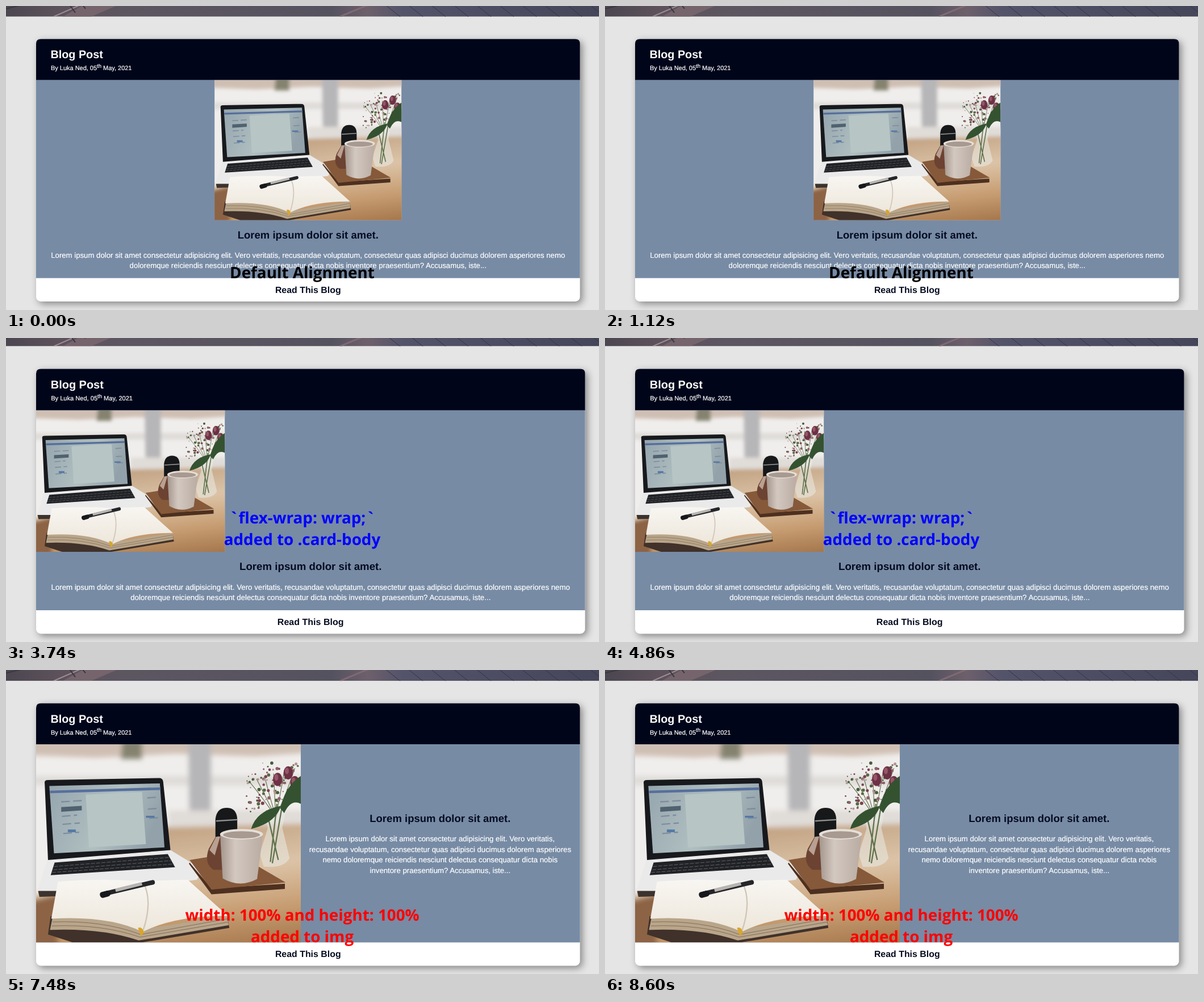
Animation, 1044 px wide and 536 px high, one loop 9350 ms. Source, as an HTML page:

```html
<!DOCTYPE html>
<html lang="en">
<head>
<meta charset="utf-8">
<title>Card layout steps</title>
<style>
  html, body { margin: 0; width: 100%; height: 100%; overflow: hidden; background: #e5e5e5; }
  svg { display: block; }
  text { font-family: "Liberation Sans", Arial, sans-serif; text-rendering: geometricPrecision; }
  .sheet { fill: #fff; filter: drop-shadow(5px 5px 8px rgba(0, 0, 0, .42)); }
  .head { fill: #00051a; }
  .body { fill: #778ba5; }
  .name { font-size: 24px; font-weight: bold; fill: #fff; }
  .byline { font-size: 13.33px; fill: #fff; stroke: #fff; stroke-width: .25px; }
  .sup { font-size: 11.5px; }
  .title { font-size: 22.4px; font-weight: bold; letter-spacing: .06px; fill: #050b20; }
  .copy { font-size: 16px; fill: #fff; stroke: #fff; stroke-width: .25px; }
  .link { font-size: 19.2px; font-weight: bold; letter-spacing: .06px; fill: #050b20; }
  .mid { text-anchor: middle; }
  .caption { font: bold 27.8px "Open Sans", "Noto Sans", sans-serif; }
</style>
</head>
<body>
<svg id="stage" width="1044" height="536" viewBox="0 0 1044 536">
  <defs>
    <linearGradient id="bannerTone">
      <stop offset="0" stop-color="#4b4650"/>
      <stop offset=".09" stop-color="#5d525b"/>
      <stop offset=".2" stop-color="#5c5661"/>
      <stop offset=".55" stop-color="#55525f"/>
      <stop offset=".61" stop-color="#6d606b"/>
      <stop offset=".67" stop-color="#53536a"/>
      <stop offset="1" stop-color="#45465a"/>
    </linearGradient>
    <linearGradient id="wood" x1=".5" x2=".75" y2="1">
      <stop offset="0" stop-color="#c0a080"/>
      <stop offset=".35" stop-color="#dcc4a8"/>
      <stop offset=".65" stop-color="#c79d72"/>
      <stop offset="1" stop-color="#9a6a40"/>
    </linearGradient>
    <linearGradient id="screen" x2="1" y2=".3">
      <stop offset="0" stop-color="#95a5ae"/>
      <stop offset=".6" stop-color="#b0bfc0"/>
      <stop offset="1" stop-color="#93a2aa"/>
    </linearGradient>
    <linearGradient id="mug">
      <stop offset="0" stop-color="#a3958c"/>
      <stop offset=".35" stop-color="#d3c8c0"/>
      <stop offset="1" stop-color="#b9aba2"/>
    </linearGradient>
    <linearGradient id="page" y2="1" x2="0">
      <stop offset="0" stop-color="#f8f6f2"/>
      <stop offset="1" stop-color="#ede6da"/>
    </linearGradient>
    <filter id="soft"><feGaussianBlur stdDeviation="4"/></filter>
    <symbol id="photo" viewBox="0 0 400 300" preserveAspectRatio="none">
      <path fill="#f0eeec" d="M0 0H400V300H0Z"/>
      <g filter="url(#soft)">
        <path fill="#cfbfb3" d="M-20-20H420V12L330 18 210 14 90 20-20 16Z"/>
        <path fill="#85836f" d="M132-20H160V22H128Z"/>
        <path fill="#dedbd8" d="M-20 48H420V62H-20Z"/>
        <path fill="#b6b5b7" d="M230-20H264V122H232Z"/>
        <path fill="#e0dcd8" d="M200 100H420V130H200Z"/>
        <path fill="url(#wood)" d="M185 126 420 120V330H-20V235L30 215Z"/>
        <path fill="#8d6444" d="M-20 240 40 225 30 330H-20Z"/>
      </g>
      <path fill="#3c332e" d="M3 222 90 202 62 229 5 231Z"/>
      <path fill="#eaeaea" d="M17 175 203 160 252 190 243 205 120 222 2 222Z"/>
      <path fill="#202226" d="M28 179 199 166 210 186 22 198Z"/>
      <path stroke="#6c7075" stroke-width=".7" fill="none" stroke-dasharray="6 2" d="M27 185 202 171M26 190 205 176M24 194 208 181"/>
      <path fill="#17191d" d="M13 59Q12 54 18 54L186 51Q191 51 192 56L203 160 18 175Z"/>
      <path fill="url(#screen)" d="M20 63 187 59 194 156 27 165Z"/>
      <path fill="#566f9c" d="M21 70 188 65V69L21 74Z"/>
      <path fill="#b7c6c5" d="M75 76 160 72 166 151 80 156Z"/>
      <path fill="#50616f" d="M38 95 69 93V100L38 102Z"/>
      <path stroke="#7e8d9e" stroke-width="2" fill="none" stroke-dasharray="13 5" d="M38 87 70 85M39 109 62 107M40 121 66 119M41 135 65 133M168 81 182 80M169 98 184 97M171 112 185 111"/>
      <path fill="#5479a6" d="M48 129H60V133H48ZM166 108H179V111H166Z"/>
      <g id="bouquet" fill="none"></g>
      <path fill="#e9ebe6" opacity=".55" d="M344 98H378L372 126 383 172Q375 188 344 185L338 166 350 127Z"/>
      <path fill="none" stroke="#60734e" stroke-width="2" d="M364 90 354 178M372 92 357 180M348 100 366 175"/>
      <path fill="#345230" d="M325 128Q333 100 370 93 362 119 325 128ZM369 97Q377 62 400 48V90Q385 82 375 104Z"/>
      <path fill="#4d301f" d="M232 179 265 218 376 211V219L265 227 231 181Z"/>
      <path fill="#85593a" d="M232 175 300 164 377 209 265 220Z"/>
      <path fill="#6c4232" d="M273 137H303V190H268Q253 180 261 158Z"/>
      <path fill="#e0d3c6" opacity=".65" d="M273 138 262 160 270 168 278 140Z"/>
      <path fill="#16181a" d="M271 140V113Q273 96 288 96T304 113V135Z"/>
      <path stroke="#8f9193" stroke-width="2" d="M272 116 304 114"/>
      <path fill="url(#mug)" d="M278 135 282 203Q308 218 334 204L343 136Z"/>
      <ellipse cx="310.500" cy="136" rx="32.500" ry="8" fill="#e6dfd8"/>
      <ellipse cx="310.500" cy="137" rx="28" ry="5.500" fill="#a89a91"/>
      <path fill="#40312a" d="M22 260 18 288 55 300H160L292 278 290 266 161 288Z"/>
      <path fill="#b9a58a" d="M29 242 21 281Q100 278 155 297L291 274 289 260 160 280Z"/>
      <path fill="none" stroke="#7e6a53" stroke-width=".8" d="M24 275Q100 272 157 292L291 269M25 269Q100 266 158 288L290 264"/>
      <path fill="url(#page)" d="M33 208 Q90 203 158 207L229 205 290 260Q210 259 161 284 110 259 23 264Z"/>
      <path fill="none" stroke="#cfc5b8" stroke-width="2" d="M162 209Q177 238 161 284"/>
      <path fill="#d9a62c" d="M154 278Q161 275 163 286L158 290Z"/>
      <path stroke="#25262a" stroke-width="7" stroke-linecap="round" d="M100 227 176 209"/>
      <path stroke="#b7b4b1" stroke-width="5" d="M120 221 160 211"/>
      <path stroke="#17181b" stroke-width="9" stroke-linecap="round" d="M101 228 108 226"/>
    </symbol>
  </defs>
</svg>
<script>
const STEP = 1870, CARD_W = 1163, HEAD_H = 88, FOOT_H = 50;
const stage = document.getElementById("stage");

const wide = ["Lorem ipsum dolor sit amet consectetur adipisicing elit. Vero veritatis, recusandae voluptatum, consectetur quas adipisci ducimus dolorem asperiores nemo",
  "doloremque reiciendis nesciunt delectus consequatur dicta nobis inventore praesentium? Accusamus, iste..."];
const medium = ["Lorem ipsum dolor sit amet consectetur adipisicing elit. Vero veritatis, recusandae voluptatum,",
  "consectetur quas adipisci ducimus dolorem asperiores nemo doloremque reiciendis nesciunt delectus",
  "consequatur dicta nobis inventore praesentium? Accusamus, iste..."];
const narrow = ["Lorem ipsum dolor sit amet consectetur adipisicing elit. Vero veritatis,",
  "recusandae voluptatum, consectetur quas adipisci ducimus dolorem asperiores",
  "nemo doloremque reiciendis nesciunt delectus consequatur dicta nobis",
  "inventore praesentium? Accusamus, iste..."];

// width and top are on screen; bodyH, img (x, width, height) and textX are in card units.
const scenes = [
  { width: 957.5, top: 58.2, bodyH: 424, img: [381.5, 400, 300], textX: 581.5, lines: wide, stacked: true,
    color: "#000", captionY: 480, caption: ["Default Alignment"] },
  { width: 958.7, top: 56.6, bodyH: 300, img: [0, 400, 300], textX: 781.5, lines: medium,
    color: "#fff", captionY: 480, caption: ["`display: flex;`", "added to .card-body"] },
  { width: 966.5, top: 54.5, bodyH: 424, img: [0, 400, 300], textX: 581.5, lines: wide, stacked: true,
    color: "#00f", captionY: 327, caption: ["`flex-wrap: wrap;`", "added to .card-body"] },
  { width: 962, top: 58.1, bodyH: 300, img: [83, 400, 300], textX: 864, lines: narrow,
    color: "#da70d6", captionY: 480, caption: ["`flex: 1;`", "added to .card-body-column"] },
  { width: 957.5, top: 58.8, bodyH: 424, img: [0, 566, 424], textX: 864, lines: narrow,
    color: "#f00", captionY: 442, caption: ["width: 100% and height: 100%", "added to img"] },
];

const text = (cls, x, y, content, extra = "") =>
  `<text class="${cls}" x="${x}" y="${y}" ${extra}>${content}</text>`;

function card(s, y, day, suffix, month) {
  const foot = HEAD_H + s.bodyH, [imgX, imgW, imgH] = s.img;
  const titleY = s.stacked ? HEAD_H + 339 : HEAD_H + s.bodyH / 2 - 11.2 * s.lines.length - .5;
  const date = `By Luka Ned, ${day}<tspan class="sup" dy="-5">${suffix}</tspan><tspan dy="5"> ${month}, 2021</tspan>`;
  return `<g transform="translate(0 ${y})">
    <rect class="sheet" width="${CARD_W}" height="${foot + FOOT_H}" rx="10"/>
    <path class="head" d="M0 ${HEAD_H}V10Q0 0 10 0H${CARD_W - 10}Q${CARD_W} 0 ${CARD_W} 10V${HEAD_H}Z"/>
    <rect class="body" y="${HEAD_H}" width="${CARD_W}" height="${s.bodyH}"/>
    <use href="#photo" x="${imgX}" y="${HEAD_H}" width="${imgW}" height="${imgH}"/>
    ${text("name", 31, 41, "Blog Post")}
    ${text("byline", 31.5, 66.5, date)}
    ${text("title mid", s.textX, titleY, "Lorem ipsum dolor sit amet.")}
    ${s.lines.map((line, i) => text("copy mid", s.textX, titleY + 41.3 + 22.4 * i, line)).join("")}
    ${text("link mid", CARD_W / 2, foot + 31.7, "Read This Blog")}
  </g>`;
}

function banner(bottom) {
  const rules = Array.from({ length: 11 }, (_, i) => `M${640 + i * 40}-24l60 48`).join("");
  return `<svg width="1044" height="${bottom}"><g transform="translate(0 ${bottom - 19})">
    <path fill="url(#bannerTone)" d="M0-9H1044V19H0Z"/>
    <path fill="#75646c" d="M100 19 150-9H215L150 19Z"/>
    <path stroke="#a08d93" stroke-width="2" d="M84 19 148-9"/>
    <path stroke="#3a3741" stroke-width="2" d="M110-4 122 12M130-7 140 5M0 5 60-9"/>
    <path stroke="#806a74" stroke-width="3" d="M588 19 655-9"/>
    <path stroke="#343548" d="${rules}"/>
  </g></svg>`;
}

function scene(s) {
  const nextCard = HEAD_H + s.bodyH + FOOT_H + 32, scale = s.width / CARD_W;
  return `<g class="scene" display="none">
    ${banner(s.top - 48 * scale)}
    <g transform="translate(53 ${s.top}) scale(${scale})">
      ${card(s, 0, "05", "th", "May")}
      ${card(s, nextCard, "21", "st", "April")}
    </g>
    ${s.caption.map((line, i) => text("caption mid", 521.5, s.captionY + 38 * i, line, `fill="${s.color}"`)).join("")}
  </g>`;
}

// Scattered blossoms and sprigs above the vase.
function bouquet() {
  let seed = 7;
  const random = () => (seed = seed * 16807 % 2147483647) / 2147483647;
  const tones = ["#7c4250", "#8c6268", "#58683f", "#b09793", "#465c38"];
  const sprigs = Array.from({ length: 90 }, (_, i) => {
    const x = 318 + random() * 78, y = 28 + random() * 62 + (x < 340 ? 12 : 0);
    return `<circle cx="${x}" cy="${y}" r="${.8 + random() * 1.8}" fill="${tones[i % 5]}"/>`;
  }).join("");
  const stems = [322, 333, 345, 359, 375, 391].map((x, i) =>
    `<path stroke="#66704e" d="M362 110Q${(x + 362) / 2} 80 ${x} ${56 - i * 4}"/>`).join("");
  const blooms = [[381, 43], [365, 53], [391, 58]].map(([x, y]) =>
    `<ellipse cx="${x}" cy="${y}" rx="7" ry="10" fill="#6d3045"/><ellipse cx="${x - 2}" cy="${y - 3}" rx="3" ry="5" fill="#955668"/>`).join("");
  return stems + sprigs + blooms;
}

document.getElementById("bouquet").innerHTML = bouquet();
stage.insertAdjacentHTML("beforeend", scenes.map(scene).join(""));
const groups = [...stage.querySelectorAll(".scene")];
const start = performance.now();

function draw(now) {
  const current = Math.floor(Math.max(0, now - start) / STEP) % groups.length;
  groups.forEach((group, i) => group.setAttribute("display", i === current ? "inline" : "none"));
  requestAnimationFrame(draw);
}
draw(start);
</script>
</body>
</html>
```
